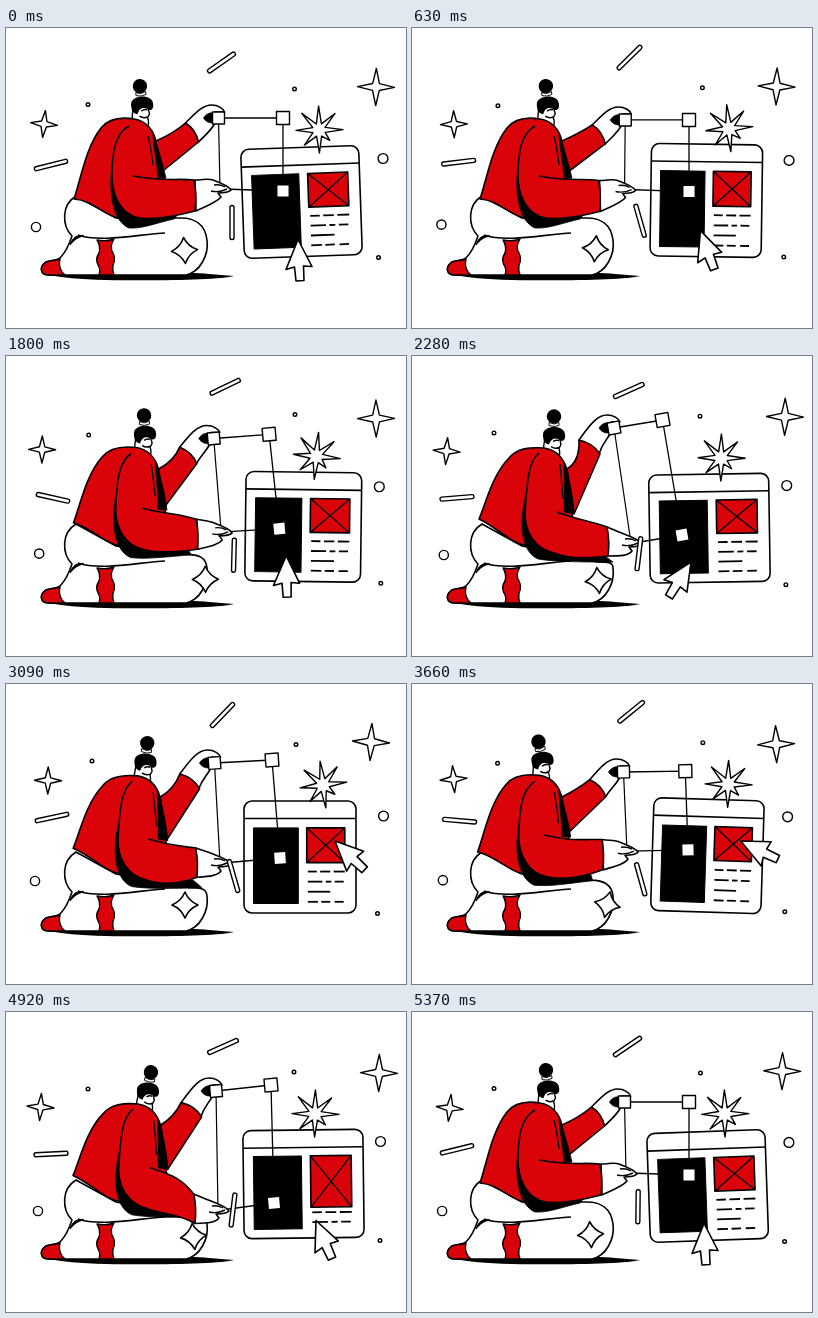
Recreate the animation shown at these times as an HTML page with a canvas. Size 400 by 300 pixels, loop 5.4 s.

```html
<!DOCTYPE html>
<html lang="en">
<head>
<meta charset="utf-8">
<title>Designer at work</title>
<style>
html, body { margin: 0; width: 100%; height: 100%; overflow: hidden; background: #fff; }
canvas { display: block; width: 400px; height: 300px; }
</style>
</head>
<body>
<canvas id="stage" width="400" height="300"></canvas>
<script>
const ctx = document.getElementById('stage').getContext('2d');
const LOOP = 5400, STEP = 30;
const RED = '#da030a', INK = '#000', PAPER = '#fff';
const rad = deg => deg * Math.PI / 180;

// Cyclic monotone curve through a few keys
function curve(times, period, vals, t) {
  const n = vals.length;
  const at = i => times[(i + n) % n] + Math.floor(i / n) * period;
  const val = i => vals[(i + n) % n];
  const rise = i => (val(i + 1) - val(i)) / (at(i + 1) - at(i));
  const slope = i => {
    const a = rise(i - 1), b = rise(i);
    return a * b <= 0 ? 0 : 2 * a * b / (a + b);
  };
  t %= period;
  let i = n - 1;
  while (i > 0 && times[i] > t) i--;
  const h = at(i + 1) - at(i), u = (t - at(i)) / h, v = 1 - u;
  return val(i) * (1 + 2 * u) * v * v + slope(i) * h * u * v * v +
    val(i + 1) * u * u * (3 - 2 * u) - slope(i + 1) * h * u * u * v;
}

let now = 0, lean = 0, sway = 0;
// act: the long story; drift: the floating pieces, twice per loop
const act = (...v) => curve([0, 1290, 2280, 3090, 4230, 4920, 5370], LOOP, [...v, v[0]], now);
const drift = (...v) => curve([0, 390, 1290, 1530, 2220], LOOP / 2, v, now);

// A point that moves by dx, dy as the body leans; torso points also sway
const q = (x, y, dx = 0, dy = 0) => `${x + dx * lean} ${y + dy * lean} `;
const p = (x, y, dx, dy) => q(x + sway, y, dx, dy);

function draw(d, fill, line = 1.6) {
  const path = new Path2D(d);
  if (fill) { ctx.fillStyle = fill; ctx.fill(path); }
  if (line) { ctx.strokeStyle = INK; ctx.lineWidth = line; ctx.stroke(path); }
}
function placed(x, y, deg, paint) {
  ctx.save();
  ctx.translate(x, y);
  ctx.rotate(rad(deg));
  paint();
  ctx.restore();
}
const poly = pts => 'M' + pts.map(pt => pt.join(' ')).join('L') + 'Z';

function finish(fill, line) {
  ctx.fillStyle = fill;
  ctx.fill();
  if (line) { ctx.strokeStyle = INK; ctx.lineWidth = line; ctx.stroke(); }
}
function disc(x, y, r, fill = PAPER, line = 1.4) {
  ctx.beginPath();
  ctx.arc(x, y, r, 0, 7);
  finish(fill, line);
}
function rounded(w, h, r, line) {
  ctx.beginPath();
  ctx.roundRect(-w / 2, -h / 2, w, h, r);
  finish(PAPER, line);
}
function star(x, y, deg, tips, inner) {
  const pts = [], n = tips.length;
  tips.forEach((r, i) => [[r, i], [inner, i + .5]].forEach(([d, k]) => {
    const a = k / n * 2 * Math.PI - Math.PI / 2;
    pts.push([Math.cos(a) * d, Math.sin(a) * d]);
  }));
  placed(x, y, deg, () => draw(poly(pts), PAPER, 1.4));
}
function bar(x, y, deg, len) {
  placed(x, y, deg, () => rounded(len, 4, 1.8, 1.4));
}

function floaters() {
  star(drift(370, 365, 364, 367, 373), drift(59, 58, 62, 63, 61), drift(1, 3, -4, -2, 1),
    [18.5, 18.5, 18.5, 18.5], 4.8);
  star(drift(38, 42, 41, 38, 34.5), drift(96, 96.5, 94, 93, 95), drift(6, 1, -6, -2, 4),
    [13.5, 13.5, 13.5, 13.5], 3.8);
  disc(drift(30, 29, 32.5, 33.5, 32), drift(199, 197, 196, 196.5, 199), 4.6);
  disc(drift(377, 377.5, 374, 373, 374.5), drift(130.5, 132, 133, 132, 129.5), 4.9);
  disc(drift(82, 86, 85, 83.5, 82), drift(76.5, 77, 80, 80, 77), 1.8);
  disc(drift(288.5, 290, 291, 290, 288), drift(61, 60.5, 58, 58, 60), 1.8);
  disc(drift(372.5, 371.5, 374, 375, 374), drift(229.5, 229.5, 227, 227, 228.5), 1.8);
  bar(drift(215.5, 216.5, 220, 220, 217), drift(34.5, 31, 27, 28, 34.5), drift(-35, -46, -33, -28, -24), 33);
  bar(drift(45, 46, 48, 48, 45), drift(137, 133.5, 139.5, 141.5, 142), drift(-14, -12, 15, 18, -3), 34);
}

function browser() {
  const w = drift(118, 112, 110, 112, 120) / 2, h = drift(109, 112, 113, 111, 108) / 2;
  const pull = act(0, 0, 0, 0, -2, 18);
  const rect = (l, t, r, b) => `M${l * w} ${t}H${r * w}V${b}H${l * w}Z`;
  placed(drift(295.5, 294, 296.5, 297, 297.5), drift(174, 173, 171, 170.5, 172),
    drift(-2, 0, 2.2, 1.6, -.7), () => {
      rounded(2 * w, 2 * h, 8, 1.6);
      draw(`M${-w} ${17.5 - h}H${w}`);
      draw(rect(-.83, -.52 * h, -.03, .83 * h), INK, 1);
      const top = -.52 * h, bottom = .1 * h + pull;
      draw(rect(.12, top, .8, bottom), RED);
      draw(`M${.12 * w} ${top}L${.8 * w} ${bottom}M${.8 * w} ${top}L${.12 * w} ${bottom}`, null, 1.3);
      [[.14, .3, .36, .54, .6, .8], [.14, .4, .46, .56, .62, .78],
       [.14, .54], [.14, .32, .38, .54, .62, .78]].forEach((row, i) => {
        const y = (.26 + i * .18) * h + pull * .8;
        if (y > .84 * h) return;
        for (let k = 0; k < row.length; k += 2) draw(`M${row[k] * w} ${y}H${row[k + 1] * w}`, null, 1.8);
      });
    });
  star(drift(313, 317, 315, 312, 309), drift(102, 101, 100, 99.5, 102), drift(-1, -7, 6, 7, 1),
    [24, 23, 24, 15, 23, 21, 23, 24], 6.6);
}

function legs() {
  draw('M44 247C100 244 180 244 203 246L228 248C215 252 150 253 100 252Q60 251 44 247Z', INK, 0);
  draw('M70 168C55 177 56 198 66 208C63 217 60 224 54 230C50 233 44 232 40 234C33 239 34 247 43 247' +
    `L180 247C194 244 203 227 201 212C${q(199, 196, 2, 10)}${q(188, 190, 8, 16)}${q(175, 190, 10, 16)}L110 190Z`, PAPER);
  draw('M40 234C45 232 50 233 54 231C52 238 55 244 59 247H43C34 247 33 239 40 234Z', RED, 1.4);
  draw('M64 217C66 210 71 206 78 208C72 209 68 212 64 217Z', INK, 1);
  draw('M72 207C95 215 134 206 159 205', null);
  draw('M91 212Q100 214 108 211Q103 219 107 225Q110 231 107 237Q106 242 108 247H93' +
    'Q95 242 92 237Q89 231 93 225Q95 218 91 212Z', RED, 1.4);
}

function sparkle() {
  const r = 13, c = 3.8;
  placed(drift(178.5, 179, 203, 203.5, 187.5), drift(222.5, 221, 220.5, 222, 224.5),
    drift(-4, 0, 16, 6, -6), () =>
      draw(`M0 ${-r}Q${c} ${-c} ${r} 0Q${c} ${c} 0 ${r}Q${-c} ${c} ${-r} 0Q${-c} ${-c} 0 ${-r}Z`, PAPER));
}

function head() {
  const x = act(136, 135.5, 142, 139.5, 122.5, 142), y = act(75, 75, 77.5, 76, 73, 77);
  const tilt = act(-7, -5, 0, 6, -32, 10);
  placed(x, y, tilt * .35, () => {
    draw('M-9 3L-12 26H4C6 22 6 18 5 15L7 11L5 2Z', PAPER, 1.4);
    draw('M-1 8Q2 6 5 7M-3 13Q1 16 5 14', null, 1.5);
    draw('M-11 1C-11 -9 11 -9 11 1C12 7 8 9 5 6C1 4 -3 5 -5 11C-10 10 -11 6 -11 1Z', INK, 0);
  });
  placed(x, y, tilt, () => {
    disc(0, -17, 7.2, INK, 0);
    draw('M-5 -11Q0 -8 5 -11L5 -8Q0 -6 -5 -8Z', PAPER, .9);
  });
}

function person(far, near) {
  const f = (x, y, dx, dy) => q(far[0] + x, far[1] + y, dx, dy);
  const n = (x, y, dx, dy) => q(near[0] + x, near[1] + y, dx, dy);

  head();

  // far hand and sleeve
  draw(`M${f(-33, 5, -2, 7)}C${f(-23, -5)}${f(-16, -13)}${f(-7, -13)}C${f(0, -13)}${f(5, -9)}${f(6, -6)}` +
    `L${f(-3, -6)}L${f(-4, 6)}C${f(-8, 13)}${f(-12, 16)}${f(-20, 24, 5, 2)}Z`, PAPER);
  draw(`M${f(-15, 0)}C${f(-11, -6)}${f(-6, -6)}${f(-2, -4)}L${f(-6, 5)}Q${f(-12, 5)}${f(-15, 0)}Z`, INK, .8);
  draw(`M${p(150, 113, 5, 0)}Q${p(168, 105)}${f(-33, 5, -2, 7)}Q${f(-23, 11, 2, 4)}${f(-20, 24, 6, 2)}` +
    `L${p(152, 147, 10, 11)}Z`, RED);

  // torso
  draw(`M${p(68, 171, -1, -8)}C${p(75, 150, -2)}${p(80, 119)}${p(95, 100, 2, 2)}` +
    `C${p(103, 90, 2, 2)}${p(116, 89, 2, 2)}${p(128, 91, 4, 1)}C${p(140, 93, 5, 1)}${p(148, 102, 4, 1)}${p(150, 114, 5)}` +
    `L${p(158, 151, 2, 7)}L${p(165, 182)}L${p(112, 190, 3)}C${p(98, 187)}${p(86, 172)}${p(68, 171, -1, -8)}Z`, RED);
  draw(`M${p(147, 107, 5)}C${p(153, 122, 4)}${p(157, 138, 4)}${p(160, 150, 2, 8)}L${p(152, 150, 0, 6)}` +
    `C${p(151, 135, 2)}${p(148, 122, 4)}${p(147, 107, 5)}Z`, INK, .8);
  draw(`M${p(142, 108, 6)}Q${p(145, 120, 4)}${p(147, 137, 4, 6)}`, null, 1.4);

  // near sleeve: shadow, hand, arm
  draw(`M${p(106, 138, 8)}C${p(102, 168, 4, 2)}${p(108, 194, 2, 2)}${p(123, 200, 3, 3)}` +
    `C${p(136, 201, 8, 5)}${q(150, 195, 20, 11)}${q(168, 191, 33, 15)}L${q(172, 186, 18, 12)}L${p(130, 180, 4, 6)}Z`, INK, .8);
  draw(`M${n(-28, -9, 1, -7)}C${n(-20, -9, 0, -4)}${n(-15, -11)}${n(-10, -9)}C${n(-2, -6)}${n(6, -3)}${n(8, 1)}` +
    `C${n(5, 4)}${n(0, 4)}${n(-5, 4)}L${n(-2, 8)}C${n(-6, 13)}${n(-14, 16, 0, -3)}${n(-27, 22, 1, -9)}Z`, PAPER);
  draw(`M${n(-12, 2)}Q${n(-4, 4)}${n(4, 0)}M${n(-9, -4)}Q${n(-3, -5)}${n(2, -2)}`, null, 1.4);
  const arm = `M${p(123, 98, 4, -1)}C${p(110, 105, 7)}${p(106, 122, 9)}${p(106, 148, 7, 10)}` +
    `C${p(106, 166, 7, 8)}${p(114, 187, 7, 5)}${p(134, 190, 8, 7)}` +
    `C${p(150, 192, 4, 10)}${p(170, 188, 4, 15)}${n(-28, 22, 2, -9)}` +
    `Q${n(-26, 6, 2, -7)}${n(-29, -9, 2, -7)}C${p(170, 150, 4, 14)}${p(158, 154, 1, 8)}${p(127, 148, 18, 8)}`;
  draw(arm, RED, 0);
  draw(arm, null);
}

function handle([x, y], s, turn) {
  placed(x, y, turn, () => draw(`M${-s / 2} ${-s / 2}h${s}v${s}h${-s}Z`, PAPER, 1.4));
}
function selection(far, near, turn) {
  const tr = [act(277, 277, 250.5, 266, 277, 265), act(90, 94, 64, 76, 94, 73)];
  const br = [act(277, 277, 270, 274, 277, 268), act(163, 165, 179, 174, 160, 191)];
  draw(`M${far}L${tr}L${br}L${near}`, null, 1.3);
  draw(`M${far}L${near[0] - 3} ${near[1]}`, null, 1.2);
  handle(tr, 13, turn);
  handle(br, 12.5, turn);
}

function cursor() {
  placed(act(292, 283, 279, 329, 328, 310), act(211.5, 193, 206, 157, 157, 208.5),
    act(0, -35, 35, -43, -69, -20), () =>
      draw(poly([[0, 0], [14, 27], [5.5, 26.5], [6, 41], [-2, 41.5], [-3.5, 27.5], [-12, 30]]), PAPER));
}

function paint() {
  ctx.fillStyle = PAPER;
  ctx.fillRect(0, 0, 400, 300);
  ctx.lineJoin = 'round';
  lean = act(0, 0, 1, .85, 0, .95);
  sway = act(0, 0, 0, 0, -4, 0);
  const far = [act(212.5, 214, 202, 208.5, 213, 210), act(90, 94, 72, 79, 94, 79)];
  const near = [act(217, 214, 222, 217, 219, 215), act(161, 163, 187, 179, 159, 198)];
  const turn = act(0, 0, -10, -4, 0, -5);
  floaters();
  browser();
  legs();
  sparkle();
  selection(far, near, turn);
  person(far, near);
  handle(far, 12, turn);
  bar(drift(226, 227.5, 229, 228.5, 227), drift(194.5, 192, 198, 199.5, 198),
    drift(90, 74, 75, 85, 97), 34);
  cursor();
}

const start = performance.now();
function tick() {
  const t = Math.max(0, performance.now() - start) % LOOP;
  now = Math.floor(t / STEP) * STEP;
  paint();
  requestAnimationFrame(tick);
}
tick();
</script>
</body>
</html>
```
